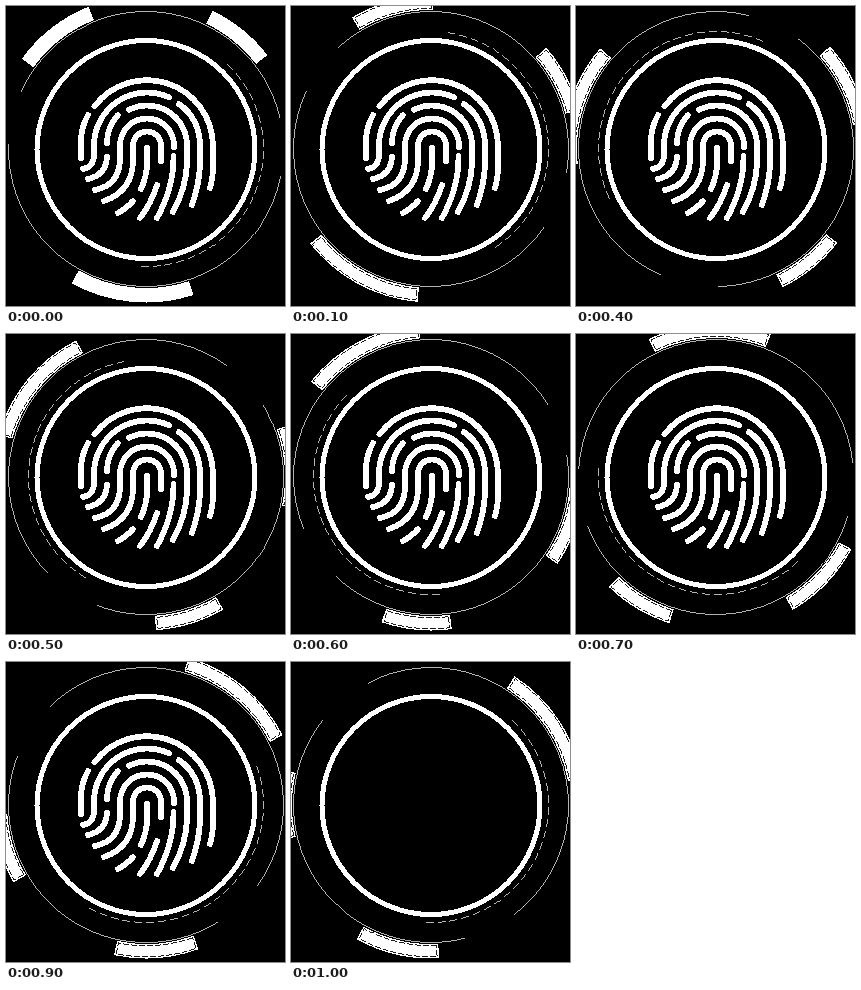
These frames come from a looping animation (279x300 px, 2000 ms). An HTML page:

```html
<!DOCTYPE html>
<html lang="en">
<head>
<meta charset="utf-8">
<title>Fingerprint scan</title>
<style>
  html, body { margin: 0; width: 100%; height: 100%; overflow: hidden; background: #000; }
  svg { display: block; width: 100%; height: 100%; shape-rendering: crispEdges; }
  path, circle { fill: none; stroke: #fff; }
  #print { stroke-width: 5.8; stroke-linecap: round; }
  #print path { stroke-width: inherit; }
  #thin, #dashes { stroke-width: .7; }
  #blocks .body { fill: #fff; stroke: none; }
  #blocks .inset { stroke: #000; stroke-width: .9; stroke-dasharray: 6 2; }
</style>
</head>
<body>
<svg viewBox="0 0 279 300">
  <g id="print">
    <!-- outer ridge -->
    <path d="M88.5 100.2A66 66 0 0 1 207 139.5V160Q207 172 204 182"/>
    <path d="M82 109Q75 121 75 136V152"/>
    <!-- second ridge -->
    <path d="M77 163Q88 161 88 148V139.5A53 53 0 0 1 163 91.3"/>
    <path d="M173 98Q194 113 194 140V160Q193 179 186 199"/>
    <!-- third ridge -->
    <path d="M112 109Q101 121 101 137"/>
    <path d="M101 151Q100 169 82 173"/>
    <path d="M123 103.8A40 40 0 0 1 181 139.5V158Q180 182 167 206"/>
    <!-- fourth ridge -->
    <path d="M89 184Q114 179 114 152V139.5A27 27 0 0 1 168 139.5V141"/>
    <path d="M167.5 150Q168 181 151 212"/>
    <!-- inner ridges -->
    <path d="M98 195Q127 185 127 154V139.5A14 14 0 0 1 155 139.5V155"/>
    <path d="M151 179Q145 198 134 212"/>
    <path d="M141 142V157Q141 170 135 183"/>
    <path d="M127 195Q121 202 112 207"/>
  </g>
  <circle cx="140" cy="143.5" r="109" stroke-width="5"/>
  <g transform="translate(140 143)">
    <g id="outer">
      <path id="thin"/>
      <g id="blocks"></g>
    </g>
    <path id="dashes" stroke-dasharray="8 4"/>
  </g>
</svg>
<script>
const $ = id => document.getElementById(id);

// Angles run clockwise in degrees, with 0 pointing right.
const point = (r, deg) => {
  const a = deg * Math.PI / 180;
  return `${(r * Math.cos(a)).toFixed(2)} ${(r * Math.sin(a)).toFixed(2)}`;
};
const sweep = (r, from, to) =>
  `A${r} ${r} 0 ${Math.abs(to - from) > 180 ? 1 : 0} ${to > from ? 1 : 0} ${point(r, to)}`;
const arc = (r, from, to) => `M${point(r, from)}${sweep(r, from, to)}`;
const sector = (inner, outer, from, to) =>
  `${arc(inner, from, to)}L${point(outer, to)}${sweep(outer, to, from)}Z`;

$("thin").setAttribute("d", arc(137.5, 11.5, 182) + arc(137.5, 204.5, 347));
$("dashes").setAttribute("d", arc(117.5, -46, 94));
$("blocks").innerHTML = [[72, 119], [216, 248], [295.7, 322.3]].map(([from, to]) =>
  `<path class="body" d="${sector(139, 153.5, from, to)}"/>
   <path class="inset" d="${sector(140.7, 151.8, from + .7, to - .7)}"/>`).join("");

const LOOP = 2000, STEP = 100;
const turns = [0, 23, 47.5, 72, 102, 124, 146.5, 172, 197, 214, 231];
const last = turns.length - 1;
const insets = document.querySelectorAll(".inset");
const start = performance.now();

function draw(now) {
  const time = Math.max(0, now - start) % LOOP;
  const step = Math.min(last, Math.floor(time / STEP));
  const turn = turns[step];
  $("outer").setAttribute("transform", `rotate(${turn})`);
  $("dashes").setAttribute("transform", `rotate(${-turn * 360 / turns[last]})`);
  $("print").style.display = step === last ? "none" : "";
  insets.forEach(path => path.style.display = step ? "" : "none");
  requestAnimationFrame(draw);
}
draw(start);
</script>
</body>
</html>
```
